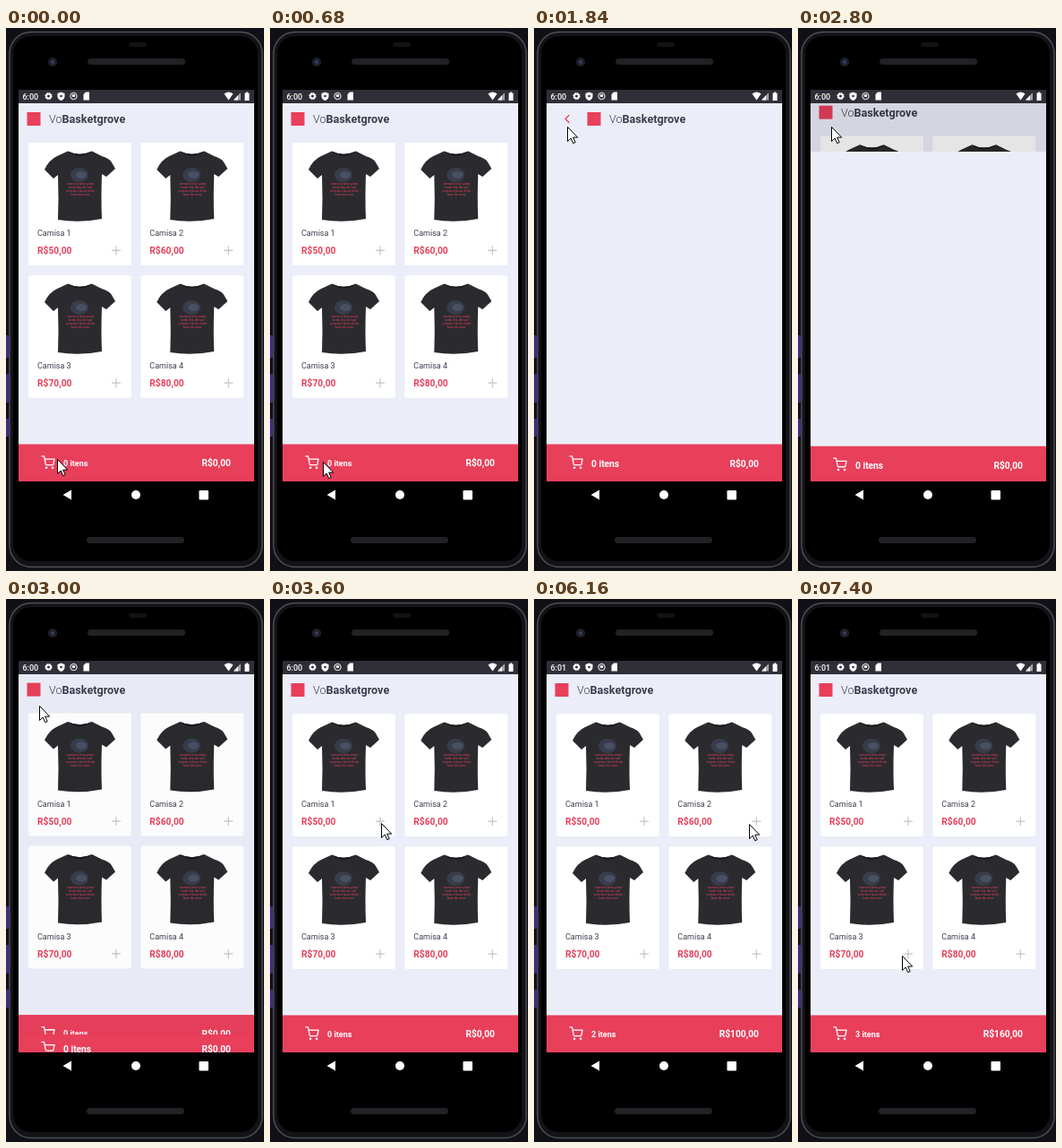
Write an HTML page that moves like this. It is 288 by 606 pixels and loops after 8 s.

```html
<!DOCTYPE html>
<html lang="pt">
<head>
<meta charset="utf-8">
<style>
  html, body { margin: 0; height: 100%; overflow: hidden; background: #101016 }
  svg { display: block; width: 288px; height: 606px; font-family: Roboto, sans-serif }
  .line { fill: none; stroke-linecap: round; stroke-linejoin: round }
  .bold { font-weight: 700 }
</style>
</head>
<body>
<svg viewBox="0 0 288 606">
  <defs>
    <clipPath id="appClip"><rect x="14" y="84" width="263" height="422"/></clipPath>
    <clipPath id="cartClip"><rect id="reveal" x="14" y="506" width="263" height="422"/></clipPath>

    <g id="title">
      <rect x="23.5" y="94" width="15" height="15" fill="#e83f5b"/>
      <text x="48" y="106" font-size="12.6" fill="#3d3d4d"><tspan font-weight="300">Vo</tspan><tspan class="bold">Basketgrove</tspan></text>
    </g>

    <g id="shirt">
      <path d="M69 137.5Q82 144 96 137.5L107 143Q116 146 118 150L122 157L112 166L107 163Q106 190 107 213Q82 218 58 214Q59 190 58 164L53 168L43 158Q48 147 57 143Z" fill="#2b2b2f"/>
      <path d="M69 137.5Q82 148 96 137.5Q82 144 69 137.5Z" fill="#19191c"/>
      <ellipse cx="82" cy="164" rx="10" ry="8" fill="#393d4a"/>
      <ellipse cx="84" cy="164" rx="6" ry="4" fill="#485164"/>
      <g font-size="4" text-anchor="middle" fill="#a83a4c" class="bold">
        <text x="83" y="175">camisa leve para</text>
        <text x="83" y="179">todo dia de sol</text>
        <text x="83" y="183">macia e bem feita</text>
        <text x="83" y="187">boa de usar</text>
      </g>
    </g>

    <g id="bar">
      <rect x="14" y="464.5" width="263" height="42" fill="#e83f5b"/>
      <g class="line" transform="translate(39.3 477.3) scale(.64)" stroke="#fff" stroke-width="2">
        <circle cx="9" cy="21" r="1"/><circle cx="20" cy="21" r="1"/>
        <path d="M1 1h4l2.7 13.4a2 2 0 0 0 2 1.6h9.7a2 2 0 0 0 2-1.6L23 6H6"/>
      </g>
    </g>
  </defs>

  <!-- phone body -->
  <path d="M0 343h3v25h-3zM0 386h3v32h-3zM0 436h3v20h-3z" fill="#45288c"/>
  <rect x="4" y="4.5" width="282" height="597" rx="24" fill="#131317" stroke="#4d4e54" stroke-width="1.5"/>
  <rect x="8" y="9" width="273" height="586" rx="20"/>
  <circle cx="52" cy="38" r="5" fill="#202028"/><circle cx="52" cy="38" r="2" fill="#2c3d68"/>
  <g fill="#222226">
    <rect x="91" y="34" width="109" height="7" rx="3.5"/>
    <rect x="90" y="568" width="109" height="7" rx="3.5"/>
    <rect x="137" y="16" width="20" height="5" rx="2" fill="#121215"/>
  </g>

  <g clip-path="url(#appClip)">
    <g id="home">
      <rect x="14" y="84" width="263" height="440" fill="#ebeef8"/>
      <use href="#title"/>
      <g id="cards"></g>
      <use href="#bar"/>
      <g fill="#fff" class="bold">
        <text id="count" x="64" y="488.5" font-size="9"></text>
        <text id="total" x="251" y="489" font-size="10.24" text-anchor="end"></text>
      </g>
    </g>
    <rect id="shade" x="14" y="84" width="263" height="422"/>
    <g clip-path="url(#cartClip)">
      <g id="cart">
        <rect x="14" y="84" width="263" height="422" fill="#ebeef8"/>
        <path class="line" d="M39 97.5l-4 4 4 4" stroke="#e83f5b" stroke-width="1.3"/>
        <use href="#title" x="36"/>
        <use href="#bar"/>
        <g fill="#fff" class="bold" font-size="10.24">
          <text x="64" y="489.5">0 itens</text>
          <text x="251" y="489.5" text-anchor="end">R$0,00</text>
        </g>
      </g>
    </g>
  </g>

  <!-- status bar -->
  <rect x="14" y="69" width="263" height="15" fill="#302f38"/>
  <g fill="#fff">
    <text id="clock" x="18.5" y="79.7" font-size="9" font-weight="500"></text>
    <circle cx="47.5" cy="76" r="2.5" fill="none" stroke="#fff" stroke-width="2"/>
    <circle cx="47.5" cy="76" r="3.7" fill="none" stroke="#fff" stroke-dasharray="1.5 1.4"/>
    <path d="M61.5 71.5l4 1.5v3q0 3.5-4 5q-4-1.5-4-5v-3z"/>
    <circle cx="61.5" cy="76" r="1.3" fill="#302f38"/>
    <circle cx="75.5" cy="76" r="3.7" fill="none" stroke="#fff"/>
    <circle cx="75.5" cy="75.5" r="1.8"/>
    <path d="M86.5 74l2.5-2.5h4v9h-6.5z"/>
    <path d="M243.5 73.5q5-4 10 0l-5 7z"/>
    <path d="M254 80.5l8-8.5v8.5z" fill-opacity=".55"/><path d="M254 80.5l5-5.3v5.3z"/>
    <path d="M267 72.5h1v-1h2v1h1.5v8.5h-5v-8.5z"/>
    <!-- navigation buttons -->
    <path d="M63.5 521l9.5-5.5v11z"/>
    <circle cx="145" cy="521" r="5"/>
    <rect x="215.5" y="516" width="10.5" height="10.5" rx="1"/>
  </g>

  <path id="cursor" d="M.5.5v16l3.7-3.5 2.5 5.7 2.5-1.1-2.5-5.5h5z" fill="#fff" stroke="#000"/>
</svg>

<script>
const $ = id => document.getElementById(id);
const H = 422;            // app height
const SLIDE = 400;        // page transition, ms
const OPEN = 964, CLOSE = 2788;

$('cards').innerHTML = [50, 60, 70, 80].map((price, i) => `
  <g transform="translate(${i % 2 * 125.3} ${(i >> 1) * 148})">
    <rect x="25" y="128" width="115" height="137" rx="3" fill="#fff"/>
    <use href="#shirt"/>
    <text x="35" y="232" font-size="9" fill="#3d3d4d">Camisa ${i + 1}</text>
    <text x="35" y="252" font-size="10.24" fill="#e83f5b" class="bold">R$${price},00</text>
    <path id="plus${i}" class="line" d="M123 243.7v9M118.5 248.2h9" stroke="#c4c4c4" stroke-width="1.2"/>
  </g>`).join('');

const clamp = x => Math.min(1, Math.max(0, x));

// cubic-bezier(.20833, .82, .25, 1), solved by bisection
const curve = (s, a, b) => 3 * (1 - s) ** 2 * s * a + 3 * (1 - s) * s * s * b + s ** 3;
function ease(x) {
  let lo = 0, hi = 1;
  for (let i = 0; i < 20; i++) {
    const mid = (lo + hi) / 2;
    if (curve(mid, .20833, .25) < x) lo = mid; else hi = mid;
  }
  return curve(hi, .82, 1);
}

// time, x, y of the pointer tip
const path = [
  [0, 57, 481], [300, 59, 484], [860, 59, 484], [1120, 60, 315], [1640, 37, 110],
  [2840, 37, 110], [3000, 37, 119], [3600, 124, 250], [4760, 124, 250],
  [5240, 252, 252], [5320, 258, 253], [5740, 258, 253], [6100, 240, 251],
  [6680, 240, 251], [7400, 116, 398], [8000, 116, 398]
];

// monotone cubic: glides through points, comes to rest where the pointer pauses
const slope = (i, axis) => path[i] && path[i + 1]
  ? (path[i + 1][axis] - path[i][axis]) / (path[i + 1][0] - path[i][0]) : 0;
function tangent(i, axis) {
  const a = slope(i - 1, axis), b = slope(i, axis);
  return a * b > 0 ? 2 * a * b / (a + b) : 0;
}
function pointer(t, axis) {
  const i = path.findIndex(k => k[0] > t) - 1;
  const p = path[i], q = path[i + 1], span = q[0] - p[0], k = (t - p[0]) / span;
  return p[axis] + (q[axis] - p[axis]) * k * k * (3 - 2 * k)
    + span * k * (1 - k) * (tangent(i, axis) * (1 - k) - tangent(i + 1, axis) * k);
}

// plus button: [card, press, release]
const taps = [[0, 3720, 3840], [0, 4440, 4680], [1, 6440, 6640]];
const totals = [0, 50, 100, 160];

function draw(t) {
  const open = ease(clamp((t - OPEN) / SLIDE)) - ease(clamp((t - CLOSE) / SLIDE));
  const hidden = H * (1 - open);
  $('reveal').setAttribute('y', 84 + Math.round(hidden));
  $('cart').setAttribute('transform', `translate(0 ${hidden * .041})`);
  $('home').setAttribute('transform', `translate(0 ${-H * .02 * open})`);
  $('shade').setAttribute('opacity', .1 * clamp(open / .36));

  const fade = [0, 0];
  for (const [card, down, up] of taps)
    fade[card] += clamp((t - down) / 60) - clamp((t - up) / 150);
  fade.forEach((f, i) => $('plus' + i).setAttribute('opacity', 1 - .8 * f));

  const n = taps.filter(tap => t >= tap[2] + 40).length;
  $('count').textContent = n + ' itens';
  $('total').textContent = `R$${totals[n]},00`;
  $('clock').textContent = t < 5000 ? '6:00' : '6:01';
  $('cursor').setAttribute('transform', `translate(${[1, 2].map(axis => Math.round(pointer(t, axis)))})`);
}

const start = performance.now();
function tick() {
  draw((performance.now() - start) % 8000);
  requestAnimationFrame(tick);
}
tick();
</script>
</body>
</html>
```
